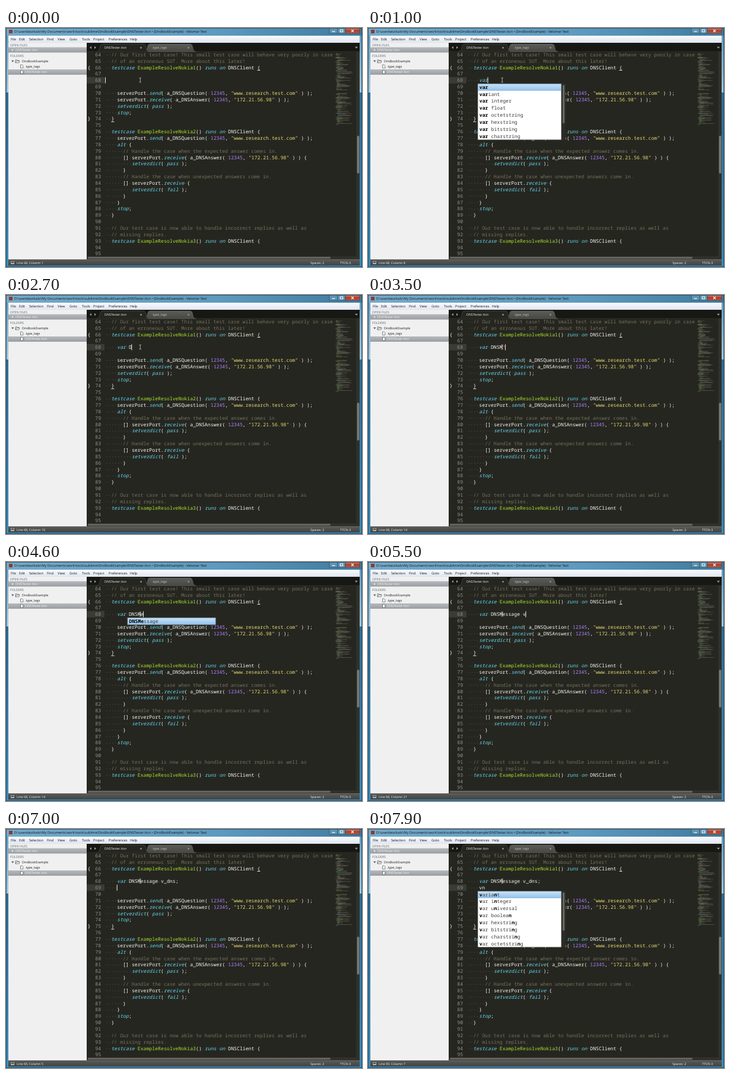
Write an HTML page that moves like this. It is 600 px wide and 404 px high and loops after 8000 ms.

```html
<!DOCTYPE html>
<html lang="en">
<head>
<meta charset="utf-8">
<title>Typing in a code editor</title>
<style>
html, body { margin: 0; width: 100%; height: 100%; overflow: hidden; background: #262620; }
svg { display: block; width: 100%; height: 100%; }
text { white-space: pre; text-rendering: geometricPrecision; }
.ui { font: 5.4px "Open Sans", sans-serif; fill: #16181a; }
.bar { font-size: 5.7px; }
.lit { fill: #f2f3f4; }
.dim { fill: #c9c9c2; }
.head { fill: #5d656d; }
.mono { font: 8.2px "Noto Sans Mono", monospace; fill: #f8f8f2; }
.num { fill: #8f908a; text-anchor: end; }
.com { fill: #75715e; }
.str { fill: #e6db74; }
.val { fill: #ae81ff; }
.key { fill: #66d9ef; font-style: italic; }
.fn { fill: #a6e22e; }
.op { fill: #f92672; }
.item { fill: #3c3c3c; }
.hit { font-weight: bold; fill: #000; }
</style>
</head>
<body>
<svg id="stage" viewBox="0 0 600 404" preserveAspectRatio="none" xmlns="http://www.w3.org/2000/svg">
<defs>
<linearGradient id="aero"><stop stop-color="#74aaca"/><stop offset=".6" stop-color="#5d9abf"/><stop offset="1" stop-color="#3f7a9e"/></linearGradient>
<linearGradient id="side" x2="0" y2="1"><stop stop-color="#5d9abf"/><stop offset=".27" stop-color="#a5c9de"/><stop offset=".27" stop-color="#2a6f9c"/><stop offset="1" stop-color="#3a8cbd"/></linearGradient>
<linearGradient id="menu" x2="0" y2="1"><stop stop-color="#fafbfd"/><stop offset="1" stop-color="#dfe5ef"/></linearGradient>
<linearGradient id="row" x2="0" y2="1"><stop stop-color="#b6b9bc"/><stop offset="1" stop-color="#9a9ea3"/></linearGradient>
<linearGradient id="status" x2="0" y2="1"><stop stop-color="#5a5c5a"/><stop offset="1" stop-color="#414341"/></linearGradient>
<linearGradient id="tab" x2="0" y2="1"><stop stop-color="#5c5d58"/><stop offset="1" stop-color="#474843"/></linearGradient>
<linearGradient id="pick" x2="0" y2="1"><stop stop-color="#c9e2f7"/><stop offset="1" stop-color="#94c2ea"/></linearGradient>
<linearGradient id="close" x2="0" y2="1"><stop stop-color="#cf7a68"/><stop offset=".5" stop-color="#b23a24"/><stop offset="1" stop-color="#c25a3e"/></linearGradient>
<clipPath id="pane"><rect x="136" y="40" width="418" height="346"/></clipPath>
</defs>
<g id="frame"></g>
<g id="code" clip-path="url(#pane)"></g>
<rect id="caret" width="1" height="10" fill="#f8f8f0"/>
<g id="popup"></g>
<path d="M224.6 84.2q1.4 0 1.6.8q.2-.8 1.6-.8M226.2 85v6M224.6 91.8q1.4 0 1.6-.8q.2.8 1.6.8" fill="none" stroke="#d8d8d2" stroke-width=".8"/>
<g id="foot"></g>
</svg>
<script>
const LOOP = 8000, CW = 4.92, LH = 10.86, LEFT = 167.6, TOP = 39.4, FIRST = 64;
const $ = id => document.getElementById(id);
const rect = (x, y, w, h, fill, more = '') =>
  `<rect x="${x}" y="${y}" width="${w}" height="${h}" fill="${fill}" ${more}/>`;
const text = (x, y, s, cls) => `<text x="${x}" y="${y}" class="${cls}">${s}</text>`;
const path = (d, fill, more = '') => `<path d="${d}" fill="${fill}" ${more}/>`;
const colX = col => LEFT + col * CW;
const rowY = row => TOP + row * LH;

const HEAD = `  // Our first test case! This small test case will behave very poorly in case
  // of an erroneous SUT. More about this later!
  testcase ExampleResolveNokia1() runs on DNSClient {
`.split('\n');

const TAIL = `
    serverPort.send( a_DNSQuestion( 12345, "www.research.test.com" ) );
    serverPort.receive( a_DNSAnswer( 12345, "172.21.56.98" ) );
    setverdict( pass );
    stop;
  }

  testcase ExampleResolveNokia2() runs on DNSClient {
    serverPort.send( a_DNSQuestion( 12345, "www.research.test.com" ) );
    alt {
      // Handle the case when the expected answer comes in.
      [] serverPort.receive( a_DNSAnswer( 12345, "172.21.56.98" ) ) {
         setverdict( pass );
      }
      // Handle the case when unexpected answers come in.
      [] serverPort.receive {
         setverdict( fail );
      }
    }
    stop;
  }

  // Our test case is now able to handle incorrect replies as well as
  // missing replies.
  testcase ExampleResolveNokia3() runs on DNSClient {

`.split('\n');

// When each edit happens, and the typed text after it
const EDITS = [
  [0, ''], [100, '  '], [200, '    '],
  [500, '    v'], [700, '    va'], [900, '    var'], [1400, '    var '],
  [2700, '    var D'], [2900, '    var DN'], [3100, '    var DNS'],
  [3300, '    var DNSM'], [3500, '    var DNSM*'], [3900, '    var DNSM'], [4400, '    var DNSMe'],
  [4700, '    var DNSMessage'], [5000, '    var DNSMessage '], [5300, '    var DNSMessage v'],
  [5800, '    var DNSMessage v_'], [6100, '    var DNSMessage v_d'],
  [6300, '    var DNSMessage v_dn'], [6500, '    var DNSMessage v_dns'],
  [6700, '    var DNSMessage v_dns;'],
  [7000, '    var DNSMessage v_dns;\n    '],
  [7400, '    var DNSMessage v_dns;\n    v'],
  [7600, '    var DNSMessage v_dns;\n    vn']
];

const VARS = ['var', 'variant', 'var integer', 'var float', 'var octetstring',
  'var hexstring', 'var bitstring', 'var charstring'];
const FUZZY = ['variant', 'var integer', 'var universal', 'var boolean', 'var hexstring',
  'var bitstring', 'var charstring', 'var octetstring'];
const POPUPS = [
  { from: 600, to: 1400, words: VARS, width: 141 },
  { from: 4500, to: 4700, words: ['DNSMessage'], width: 149 },
  { from: 7500, to: 7600, words: VARS, width: 141 },
  { from: 7600, to: LOOP, words: FUZZY, width: 141 }
];

const TOKEN = /(\/\/.*)|("[^"]*")|\b(\d+)\b|\b(testcase|runs|on|send|receive|setverdict|stop|alt|var|pass|fail)\b|\b(Example\w+)|(\*)|\w+|[^\w\s"]+/g;
const KINDS = ['com', 'str', 'val', 'key', 'fn', 'op'];

function codeLine(line, y) {
  let out = '';
  for (const m of line.matchAll(TOKEN)) {
    const kind = KINDS.find((k, i) => m[i + 1] !== undefined) || '';
    out += `<tspan x="${colX(m.index)}" class="${kind}">${m[0]}</tspan>`;
  }
  return `<text y="${y}" class="mono">${out}</text>`;
}

function drawCode(typed) {
  const edit = typed.split('\n');
  const lines = [...HEAD, ...edit, ...TAIL];
  const active = HEAD.length + edit.length - 1;
  const open = 2, shut = lines.indexOf('  }');
  let out = rect(136, rowY(active), 30, LH, '#3a3b35'), dots = '';
  lines.forEach((line, row) => {
    const y = rowY(row) + 8.4;
    out += text(160.2, y, FIRST + row, 'mono num') + codeLine(line, y);
    for (const m of line.split('//')[0].matchAll(/ /g)) dots += `M${colX(m.index) + 2.1} ${y - 2.4}h.9`;
  });
  for (const [row, mark] of [[open, '{'], [shut, '}']]) {
    const y = rowY(row);
    out += text(137.5, y + 8.4, mark, 'mono');
    out += rect(colX(lines[row].indexOf(mark)), y + 10, CW, .9, '#f8f8f2');
  }
  return out + path(dots, 'none', 'stroke="#66655a" stroke-width=".9"');
}

// Completion entry with the matched letters in bold
function entry(word, typed, x, y) {
  let n = 0, out = '';
  [...word].forEach((ch, i) => {
    const hit = ch === typed[n];
    if (hit) n++;
    if (ch !== ' ') out += `<tspan x="${x + i * CW}" class="${hit ? 'hit' : 'item'}">${ch}</tspan>`;
  });
  return `<text y="${y}" class="mono">${out}</text>`;
}

function drawPopup({ words, width }, row, line) {
  const typed = line.match(/\w*$/)[0];
  const x = colX(line.length - typed.length) - 2.3, y = rowY(row + 1) + .5;
  const step = 11.85, h = words.length * step;
  let out = rect(x, y, width, h, '#fff', 'stroke="#55564e" stroke-width=".8"');
  if (words.length > 1) {
    out += rect(x + width, y - .4, 7.5, h + .8, '#2c2d28');
    out += rect(x + width + 2, y + 2, 3.4, 65, '#65665f', 'rx="1.7"');
  }
  out += rect(x + .8, y + .6, width - 1.6, step - 1, 'url(#pick)', 'stroke="#6fa5d6" stroke-width=".6"');
  words.forEach((w, i) => out += entry(w, typed, x + 2.8, y + i * step + 8.5));
  return out;
}

function drawMinimap() {
  let seed = 11, out = '';
  const rnd = () => (seed = seed * 16807 % 2147483647) / 2147483647;
  const tints = ['#75715e', '#a3a39a', '#5aa5b3', '#86a83f', '#aaa267'];
  for (let i = 0; i < 155; i++) {
    if (rnd() < .2) continue;
    const x = 555.5 + Math.floor(rnd() * 4) * 1.2, w = 3 + rnd() ** 1.6 * 23;
    const cut = w * (.2 + rnd() * .4), y = 42 + i * .79;
    const tint = tints[Math.floor(rnd() * tints.length)];
    out += rect(x, y, cut, .5, tint, 'opacity=".7"');
    out += rect(x + cut + .6, y, w - cut, .5, tints[i % 9 < 5 ? 0 : 1], 'opacity=".6"');
  }
  return out;
}

function drawFrame() {
  let out = rect(0, 0, 600, 404, 'url(#side)') + rect(0, 0, 600, 13, 'url(#aero)') + rect(0, 0, 600, .8, '#2c4557')
    + rect(0, 0, .8, 404, '#1f3f54') + rect(599.2, 0, .8, 404, '#1f3f54') + rect(0, 403.2, 600, .8, '#1f3f54');
  // title bar
  out += rect(5, 3, 6, 6, '#8f3a30');
  out += text(14, 8.2, 'D:\\userdata\\kalo\\My Documents\\work\\tools\\sublime\\DnsBookExample\\DNSTester.ttcn • (DnsBookExample) - Velomar Text', 'ui bar');
  const edge = 'stroke="#24455c" stroke-width=".6"';
  out += rect(545, .5, 14, 8.5, '#5f93b3', edge) + rect(559, .5, 13, 8.5, '#5f93b3', edge)
    + rect(572, .5, 24, 8.5, 'url(#close)', edge);
  out += rect(549.5, 5.4, 5, 1.2, '#fff')
    + rect(563.3, 3, 4.4, 3.6, 'none', 'stroke="#fff" stroke-width="1"')
    + path('M582 2.8l4 4M586 2.8l-4 4', 'none', 'stroke="#fff" stroke-width="1.2"');
  // menu
  out += rect(4, 13, 592, 12, 'url(#menu)');
  const menu = { File: 8, Edit: 22, Selection: 39, Find: 69, View: 87, Goto: 107, Tools: 128, Project: 147, Preferences: 173, Help: 209 };
  for (const [name, x] of Object.entries(menu)) out += text(x, 21, name, 'ui bar');
  // side bar
  out += rect(4, 25, 132, 366, '#f0f0f0') + rect(4, 32.5, 132, 9, 'url(#row)') + rect(4, 70, 132, 9, 'url(#row)');
  out += text(7, 31.2, 'OPEN FILES', 'ui head') + text(7, 49.2, 'FOLDERS', 'ui head');
  out += '<circle cx="11" cy="37.2" r="1.3" fill="#e6e9ec"/>' + text(16, 39, 'DNSTester.ttcn', 'ui lit');
  out += path('M9 54.8h4.4l-2.2 3z', '#555c62') + path('M16 58.8v-5h2.4l.8 1h3v1M16 58.8l1.4-3h5.6l-1.2 3z', '#f5f6f7', 'stroke="#4c5359" stroke-width=".7"');
  out += text(27, 58, 'DnsBookExample', 'ui') + text(32, 67, '.type_tags', 'ui') + text(32, 76.3, 'DNSTester.ttcn', 'ui lit');
  for (const y of [62.2, 71.5]) out += path(`M24.5 ${y}h2.8l1.5 1.5v4h-4.3z`, '#fafafa', 'stroke="#4c5359" stroke-width=".7"');
  // tabs
  out += rect(136, 25, 460, 366, '#262620') + rect(136, 25, 460, 15, '#171814') + rect(136, 39.4, 460, .7, '#33342d');
  out += path('M233 40q4 0 5-6l1-4q1-3 4-3h67q3 0 4 3l1 4q1 6 5 6z', 'url(#tab)', 'stroke="#6a6b64" stroke-width=".6"');
  out += path('M153 40q4 0 5-6l1-4q1-3 4-3h68q3 0 4 3l1 4q1 6 5 6z', '#262620', 'stroke="#55564f" stroke-width=".6"');
  out += rect(154, 39.3, 86, 1.2, '#262620');
  out += text(166, 35.2, 'DNSTester.ttcn', 'ui lit') + text(246, 35.2, '.type_tags', 'ui dim');
  out += '<circle cx="227.5" cy="33.3" r="1.5" fill="#8b8c85"/><circle cx="307.5" cy="33.3" r="1.5" fill="#8b8c85"/>';
  out += path('M144 30.8v4.4l-3-2.2zM149 30.8v4.4l3-2.2zM588 31.8h5l-2.5 3z', '#9b9c95');
  // minimap and scroll bars
  out += drawMinimap() + rect(590.5, 40, 5.5, 346, '#30312b') + rect(591.6, 182, 3.8, 64, '#7a7b74', 'rx="1.9"');
  out += rect(136, 386, 460, 5, '#30312b') + rect(138, 386.8, 409, 3.2, '#65665f', 'rx="1.6"');
  // status bar
  out += rect(4, 391, 592, 10.5, 'url(#status)') + rect(4, 391, 592, .6, '#777973');
  out += rect(8.5, 394.4, 5.2, 4.4, 'none', 'stroke="#c4c5c0" stroke-width=".6"') + rect(8.5, 397.2, 5.2, 1.6, '#c4c5c0');
  out += text(513, 399, 'Spaces: 2', 'ui lit') + text(563, 399, 'TTCN-3', 'ui lit');
  return out;
}

let shown = '';

function update(t) {
  const [since, typed] = EDITS.findLast(e => e[0] <= t);
  const box = POPUPS.find(p => t >= p.from && t < p.to);
  const edit = typed.split('\n'), line = edit[edit.length - 1];
  const row = HEAD.length + edit.length - 1;
  $('caret').setAttribute('opacity', (t - since) % 1000 < 300 ? 1 : 0);

  const key = since + ':' + (box ? box.from : '');
  if (key === shown) return;
  shown = key;
  $('code').innerHTML = drawCode(typed);
  $('caret').setAttribute('x', colX(line.length) - .6);
  $('caret').setAttribute('y', rowY(row) + .5);
  $('popup').innerHTML = box ? drawPopup(box, row, line) : '';
  $('foot').innerHTML = text(18, 399, `Line ${FIRST + row}, Column ${line.length + 1}`, 'ui lit');
}

$('frame').innerHTML = drawFrame();

function tick() {
  update(performance.now() % LOOP);
  requestAnimationFrame(tick);
}
tick();
</script>
</body>
</html>
```
